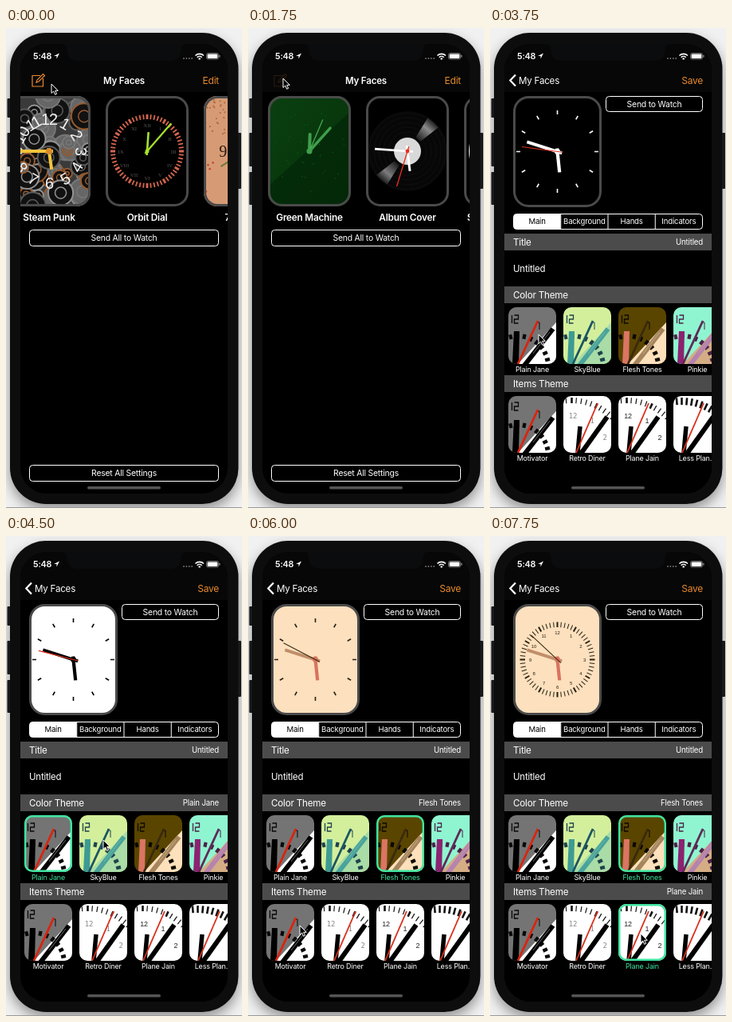
Animation of 296x600 px, one loop 8 s. Source, as an HTML page:

```html
<!DOCTYPE html>
<html lang="en">
<head>
<meta charset="utf-8">
<title>Watch face editor</title>
<style>
html, body { margin: 0; width: 100%; height: 100%; overflow: hidden; background: #f1f1f1; }
svg { display: block; }
text { font-family: Inter, Roboto, sans-serif; letter-spacing: -.02em; fill: #fff; }
.mono { font-family: "DejaVu Sans Mono", monospace; }
.arial { font-family: "Liberation Sans", sans-serif; }
.serif { font-family: "Liberation Serif", serif; }
</style>
</head>
<body>
<svg id="stage" width="296" height="600" viewBox="0 0 296 600"></svg>
<script>
const LOOP = 8000, STEP = 250, ORANGE = '#e88a2e', MINT = '#3fe5a0', GRAY = '#4a4a4a';

// ---- markup helpers ----
const g = (body, attrs = '') => `<g ${attrs}>${body}</g>`;
const text = (x, y, s, size, attrs = '') => `<text x="${x}" y="${y}" font-size="${size}" ${attrs}>${s}</text>`;
const mid = 'text-anchor="middle"', end = 'text-anchor="end"';
const rect = (x, y, w, h, r, fill, attrs = '') =>
  `<rect x="${x}" y="${y}" width="${w}" height="${h}" rx="${r}" fill="${fill}" ${attrs}/>`;
const line = (x1, y1, x2, y2, color, w, attrs = '') =>
  `<line x1="${x1}" y1="${y1}" x2="${x2}" y2="${y2}" style="stroke:${color}" stroke-width="${w}" ${attrs}/>`;
const circle = (x, y, r, fill, attrs = '') => `<circle cx="${x}" cy="${y}" r="${r}" fill="${fill}" ${attrs}/>`;
const path = (d, attrs) => `<path d="${d}" ${attrs}/>`;
const at = (x, y) => `transform="translate(${x} ${y})"`;
const times = (n, fn) => Array.from({ length: n }, (_, i) => fn(i)).join('');
const ticks = (n, r0, r1, color, width) => times(n, i =>
  line(0, -r0, 0, -r1, color, width(i), `transform="rotate(${i * 360 / n})"`));
const numerals = (r, size, color, cls, every = 1) => times(12 / every, i => {
  const n = (i + 1) * every, a = n * Math.PI / 6;
  return text(r * Math.sin(a), -r * Math.cos(a) + size * .36, n, size, `${mid} class="${cls}" style="fill:${color}"`);
});
const hand = (angle, tail, length, color, w, attrs = '') =>
  line(0, tail, 0, -length, color, w, `transform="rotate(${angle})" ${attrs}`);
const button = (y, x, w, h, label) =>
  rect(x, y, w, h, 4, 'none', 'stroke="#fff"') + text(x + w / 2, y + h / 2 + 3.8, label, 10.4, mid);

let seed = 7;
const rnd = () => (seed = seed * 16807 % 2147483647) / 2147483647;

// ---- face cards, drawn around their centre ----
const greenFace = () =>
  rect(-52, -69, 104, 138, 0, 'url(#green)') +
  path('M52 -50V69H-52V44Z', 'fill="#021c05" opacity=".45"') +
  times(36, i => circle(44 * Math.sin(i * 2.4) * (i % 3 + 1) / 3, -50 * Math.cos(i * 2.4) * (i % 3 + 1) / 3, .7, '#0b5a18')) +
  hand(42, 0, 39, '#3f9e4c', 3.4, 'stroke-linecap="round"') + hand(2, 0, 21, '#3f9e4c', 4, 'stroke-linecap="round"') +
  hand(23, 0, 43, '#4fae5c', 1.2) + circle(0, 0, 3.6, '#3f9e4c');

const vinylFace = () => {
  const shine = (a, o) => path('M-4 -20L-9 -48A49 49 0 0 1 9 -48L4 -20Z', `fill="url(#shine)" opacity="${o}" transform="rotate(${a})"`);
  return circle(0, 0, 50, '#070707') +
    times(5, i => circle(0, 0, 24 + i * 6, 'none', 'stroke="#141414" stroke-width=".7"')) +
    shine(42, .9) + shine(222, .8) + circle(0, 0, 17, '#d9d9d9') +
    hand(274, 7, 41, '#fff', 2.6) + hand(173, 7, 25, '#fff', 3) +
    hand(197, 6, 46, '#e5301c', 1.3) + circle(0, 0, 2.4, '#e5301c');
};

const blossomFace = () => circle(0, 0, 46, '#fff') + ticks(12, 36, 42, '#222', () => 2) +
  hand(174, 4, 24, '#222', 4) + hand(288, 4, 36, '#222', 3);

const steamFace = () => rect(-52, -69, 104, 138, 0, '#3a3a3a') +
  times(60, i => {
    const x = rnd() * 110 - 55, y = rnd() * 140 - 70, r = 4 + rnd() * 11;
    const color = i % 4 == 1 ? '#96592c' : ['#777', '#5a5a5a', '#929292'][i % 3];
    return circle(x, y, r + 1.5, i % 3 ? '#111' : '#666', `stroke="${color}" stroke-width="2"`) +
      circle(x, y, r * .5, 'none', `stroke="${color}" stroke-width="1.5"`);
  }) +
  times(12, i => {
    const n = i + 1, flip = n > 3 && n < 9;
    return g(text(0, 7, n, 20, `${mid} class="arial" style="fill:#f2f2f2;letter-spacing:-1px"`),
      `transform="rotate(${n * 30}) translate(0 -40) rotate(${flip ? 180 : 0})"`);
  }) +
  hand(270, 5, 40, '#f3c43c', 4) + hand(172, 4, 23, '#f3c43c', 4) + circle(0, 0, 4, '#d98a2a');

const ROMAN = 'I II III IV V VI VII VIII IX X XI XII'.split(' ');
const orbitFace = () => ticks(60, 40, 46, '#d5664f', i => i % 5 ? 1.8 : 2.8) +
  ROMAN.map((s, i) => text(33 * Math.sin((i + 1) * Math.PI / 6), 3 - 33 * Math.cos((i + 1) * Math.PI / 6), s, 7,
    `${mid} class="serif" style="fill:#555"`)).join('') +
  hand(41, 4, 46, '#a6e22e', 2.2) + hand(4, 5, 24, '#a6e22e', 2.6) + circle(0, 0, 2.5, '#a6e22e');

const glowFace = () => rect(-52, -69, 104, 138, 0, '#d69b74') +
  times(140, () => circle(rnd() * 104 - 52, -69 + rnd() * rnd() * 60, 1.1, '#b5693f')) +
  times(12, () => circle(rnd() * 104 - 52, rnd() * 60, 1.4, '#c0503a')) +
  numerals(28, 20, '#2b1a10', 'serif', 3) + hand(238, 4, 36, '#6d7a3a', 2) + hand(150, 4, 24, '#4b3a1a', 3);

const cards = [
  ['Green Machine', greenFace], ['Album Cover', vinylFace], ['Summer Blossom', blossomFace],
  ['Steam Punk', steamFace], ['Orbit Dial', orbitFace], ['70s Glow', glowFace]
].map(([name, draw], i) => g(
  g(rect(-52, -69, 104, 138, 17, '#000') + draw(), 'clip-path="url(#card)"') +
  rect(-50.5, -67.5, 101, 135, 16, 'none', `stroke="${GRAY}" stroke-width="3"`) +
  text(0, 86.5, name, 11.8, `${mid} font-weight="600"`), at(77 + i * 123, 154))).join('');

// ---- theme thumbnails ----
const bigDial = ([bg, alt, hour, minute, sec, ink], drop = 0) =>
  rect(0, 0, 60, 71, 0, bg) + path('M60 19V71H12Z', `fill="${alt}"`) +
  path(`M4.500 ${10 + drop}v10M7.500 ${10 + drop}h5v5h-5v5h5`, `fill="none" stroke="${ink}" stroke-width="1.3"`) +
  path('M36.500 19H39V28', `fill="none" stroke="${ink}"`) +
  g(times(9, i => rect(-2, -41, 4.2, 6, 0, ink, `transform="rotate(${i * 13 - 14})"`)), at(12, 74)) +
  path('M7 30H14L13 71H5Z', `fill="${hour}"`) + line(56, 27, 20, 73, minute, 6) +
  line(52, 31, 31, 58, alt, 1, 'opacity=".4"') + line(37, 17, 12, 71, sec, 2.8);

const whiteDial = (cls, shift = 0, wide) => rect(0, 0, 60, 71, 0, '#fff') +
  g(times(20, i => rect(-.8, -76, i % 5 == 2 || wide ? 2.6 : 1.2, wide ? 9 : 7, 0, '#111', `transform="rotate(${i * 5 - 10})"`)), at(10, 78)) +
  (cls && [[12, 12, 28], [1, 36, 34], [2, 52, 55]].map(([n, x, y]) =>
    text(x, y, n, 9, `${mid} class="${cls}" style="fill:${cls == 'mono' ? '#888' : '#222'}"`)).join('')) +
  g(line(16, 38, 13, 71, '#000', 5.5) + line(50, 26, 17, 72, '#000', 6) + line(38, 9, 11, 71, '#d8301c', 1.8), at(shift, 0));

const PLAIN = ['#747474', '#fff', '#000', '#000', '#d82510', '#080808'];
const colorThemes = [
  ['Plain Jane', bigDial(PLAIN)],
  ['SkyBlue', bigDial(['#d3ef9c', '#a9dca6', '#3d9b93', '#4aa39b', '#1b5564', '#20424c'])],
  ['Flesh Tones', bigDial(['#5a4500', '#fde0bc', '#da7562', '#a5855d', '#3a2a10', '#0c0900'])],
  ['Pinkie', bigDial(['#8ff5d0', '#d4ad84', '#8c2270', '#b583ae', '#5f2a58', '#4a2348'])]
];
const itemThemes = [
  ['Motivator', bigDial(PLAIN, -2)], ['Retro Diner', whiteDial('mono', 5)],
  ['Plane Jain', whiteDial('arial')], ['Less Plan…', whiteDial('', 0, true)]
];
const thumbRow = (id, themes, y) => themes.map(([name, art], i) => g(
  g(art, 'clip-path="url(#thumb)"') +
  rect(1.2, 1.2, 57.6, 68.6, 9, 'none', `class="ring" stroke="${MINT}" stroke-width="2.4"`) +
  text(30, 81.3, name, 9, mid), `id="${id}${i}" ` + at(23 + i * 69, y))).join('');
const bar = (y, label, id, value = '') => rect(18, y, 260, 21, 0, '#4b4b4b') +
  text(29, y + 14.7, label, 11.7) + text(267, y + 14.3, value, 9.7, `${end} id="${id}"`);

// ---- editor ----
const indicators = [
  ticks(12, 46.5, 51.5, 'var(--k)', () => 1.6),
  ticks(60, 42, 47, 'var(--k)', i => i % 5 ? 1.6 : 3) + numerals(34, 8, 'var(--k)', 'mono'),
  ticks(60, 43, 47, 'var(--k)', i => i % 5 ? .8 : 2) + numerals(35, 8, 'var(--k)', 'mono'),
  ticks(60, 40.5, 47, 'var(--k)', i => i % 5 ? 1 : 2) + numerals(34, 6, 'var(--k)', 'arial')
].map((s, i) => g(s, `id="ind${i}"`)).join('');

const clock = g(
  rect(-54, -68, 108, 136, 18, '', `style="fill:var(--bg);stroke:${GRAY}" stroke-width="3"`) + indicators +
  hand(174, 4, 26, 'var(--h)', 4.2) + hand(287.6, 6, 40, 'var(--m)', 3.8) +
  circle(0, 0, 3.4, '', 'style="fill:var(--h)"') +
  g(line(0, 6, 0, -45, 'var(--s)', 1.1), 'id="second"'), 'id="clock" ' + at(84.5, 154.5));

const segments = rect(29.5, 232.5, 237, 19, 4, 'none', 'stroke="#fff"') +
  path('M88.5 232.5H33.5a4 4 0 0 0 -4 4v11a4 4 0 0 0 4 4H88.5Z', 'fill="#fff"') +
  ['Main', 'Background', 'Hands', 'Indicators'].map((s, i) => {
    const x = 29.5 + i * 59.25;
    return (i ? line(x, 232, x, 252, '#fff', 1) : '') +
      text(x + 29.6, 245.4, s, 9.6, mid + (i ? '' : ' style="fill:#000"'));
  }).join('');

const editor = rect(18, 80, 260, 502, 0, '#000') + clock + button(85.5, 145.5, 121, 19, 'Send to Watch') + segments +
  bar(257, 'Title', 'title', 'Untitled') + text(29, 304.5, 'Untitled', 11.5) +
  bar(323, 'Color Theme', 'colorName') + thumbRow('color', colorThemes, 349) +
  bar(434, 'Items Theme', 'itemName') + thumbRow('item', itemThemes, 460);

const listPage = g(cards, 'id="cards"') +
  button(252.5, 29.5, 237, 20, 'Send All to Watch') + button(546.5, 29.5, 237, 20, 'Reset All Settings');

const listNav = g(path('M43 59.5H33V73H46.5V63M38 68L39 65L46.5 57.5L48.5 59.5L41 67Z', 'fill="none"'),
    `id="compose" stroke="${ORANGE}" stroke-width="1.2"`) +
  text(148, 69.5, 'My Faces', 11.6, `${mid} font-weight="600"`) + text(267, 69.5, 'Edit', 12, `${end} style="fill:${ORANGE}"`);
const editNav = path('M32 58.5L25.3 65.5L32 72.5', 'fill="none" stroke="#fff" stroke-width="2.2"') +
  text(36, 69.5, 'My Faces', 11.6) + text(267, 69.5, 'Save', 12, `${end} style="fill:${ORANGE}"`);

const status = text(34, 39, '5:48', 10.8, 'font-weight="600"') +
  path('M67 31.5L60 35H63.5V38.5Z', 'fill="#fff"') +
  times(4, i => circle(223 + i * 3.4, 38, .9, '#777')) +
  path('M237.5 34.5a7.5 7.5 0 0 1 10.5 0M239.7 36.7a4.3 4.3 0 0 1 6 0', 'fill="none" stroke="#fff" stroke-width="1.6"') +
  circle(242.7, 38.4, 1.2, '#fff') +
  rect(251.5, 31.5, 15, 7.5, 2, 'none', 'stroke="#888" stroke-width=".8"') + rect(252.6, 32.6, 12.8, 5.3, 1.2, '#fff') +
  rect(267.3, 33.8, 1.2, 3, .5, '#888');

const phone = [[1.5, 88, 24], [1.5, 131, 42], [1.5, 180, 41], [290, 131, 70]].map(([x, y, h]) => rect(x, y, 5, h, 1, '#1c1f20')).join('') +
  rect(5, 6, 286.5, 589, 45, '#0e1011', 'filter="url(#shadow)"') + rect(18, 20, 260, 562, 33, '#000');

const stage = document.getElementById('stage');
stage.innerHTML = `<defs>
  <clipPath id="screen">${rect(18, 20, 260, 562, 33, '#000')}</clipPath>
  <clipPath id="card">${rect(-52, -69, 104, 138, 17, '#000')}</clipPath>
  <clipPath id="thumb">${rect(0, 0, 60, 71, 10, '#000')}</clipPath>
  <filter id="shadow"><feDropShadow dx="0" dy="7" stdDeviation="8" flood-opacity=".4"/></filter>
  <linearGradient id="green" x2="1" y2="1"><stop stop-color="#0a3f10"/><stop offset="1" stop-color="#063209"/></linearGradient>
  <linearGradient id="shine" x2="0" y2="1"><stop stop-color="#222"/><stop offset=".4" stop-color="#999"/><stop offset="1" stop-color="#222"/></linearGradient>
</defs>` + rect(0, 0, 296, 600, 0, '#f1f1f1') + phone + rect(0, 599, 296, 1, 0, '#999') +
  g(g(listPage, 'id="list"') + g(editor, 'id="editor"') + rect(18, 20, 260, 60, 0, '#070707') +
    g(listNav, 'id="listNav"') + g(editNav, 'id="editNav"') + status +
    path('M70 20Q76 20 76 26Q77 41 90 41H206Q219 41 220 26Q220 20 226 20Z', 'fill="#0b0c0d"') +
    rect(102, 573, 92, 3.6, 1.8, '#555'), 'clip-path="url(#screen)"') +
  path('M0 0V11.5L2.7 9L4.6 13.3L6.6 12.4L4.7 8.3H8.3Z', 'id="cursor" fill="#000" stroke="#fff"');

// ---- timeline ----
const el = id => document.getElementById(id);
const palettes = [ // face, hour, minute, second, ink
  ['#000', '#fff', '#fff', '#e0301c', '#fff'],
  ['#fff', '#000', '#000', '#e0301c', '#000'],
  ['#a9dca8', '#4aa79c', '#4aa79c', '#1b5564', '#1f4d55'],
  ['#fde0be', '#d9735f', '#c08e6a', '#3a2a10', '#2a2010']
];
const colorTaps = [4000, 4750, 5500], itemTaps = [6250, 6750, 7500];
const cursorKeys = [[0, 57, 70], [500, 44, 63], [2500, 44, 63], [3500, 61, 383], [4000, 61, 383], [4500, 122, 380],
  [4750, 122, 380], [5250, 190, 376], [5500, 190, 376], [6000, 65, 487], [6250, 65, 487], [6750, 122, 492],
  [7000, 122, 492], [7500, 189, 497], [8000, 189, 497]];

function cursorAt(t) {
  const i = cursorKeys.findIndex(k => k[0] > t);
  const [t0, x0, y0] = cursorKeys[i - 1], [t1, x1, y1] = cursorKeys[i];
  const p = (t - t0) / (t1 - t0), e = p * p * (3 - 2 * p);
  return [x0 + (x1 - x0) * e, y0 + (y1 - y0) * e];
}

const show = (id, on) => el(id).style.display = on ? '' : 'none';

function select(id, themes, chosen) {
  themes.forEach((_, i) => {
    const on = i == chosen - 1, thumb = el(id + i);
    thumb.querySelector('.ring').style.display = on ? '' : 'none';
    thumb.lastElementChild.style.fill = on ? MINT : '#fff';
  });
  el(id + 'Name').textContent = chosen ? themes[chosen - 1][0] : '';
}

function render(t) {
  const push = t < 2000 ? 0 : t < 2250 ? .65 : 1;
  const slide = (id, x) => el(id).setAttribute('transform', `translate(${x} 0)`);
  slide('cards', -392 * Math.max(0, 1 - t / 1000) ** 3);
  slide('list', -78 * push);
  slide('editor', 260 * (1 - push));
  show('list', push < 1);
  show('editor', push);
  el('listNav').style.opacity = 1 - push;
  el('editNav').style.opacity = push;
  el('compose').style.opacity = t >= 1500 ? .15 : 1;

  const taps = list => list.filter(x => t >= x).length;
  const color = taps(colorTaps), item = taps(itemTaps);
  ['bg', 'h', 'm', 's', 'k'].forEach((v, i) => el('clock').style.setProperty('--' + v, palettes[color][i]));
  for (let i = 0; i < 4; i++) show('ind' + i, i == item);
  select('color', colorThemes, color);
  select('item', itemThemes, item);
  el('second').setAttribute('transform', `rotate(${264.5 + 8.8 * (t - 2250) / 1000})`);
  el('cursor').setAttribute('transform', `translate(${cursorAt(t)})`);
}

const start = performance.now();
let last = -1;
function tick() {
  const t = Math.floor((performance.now() - start) % LOOP / STEP) * STEP;
  if (t != last) render(last = t);
  requestAnimationFrame(tick);
}
tick();
</script>
</body>
</html>
```
